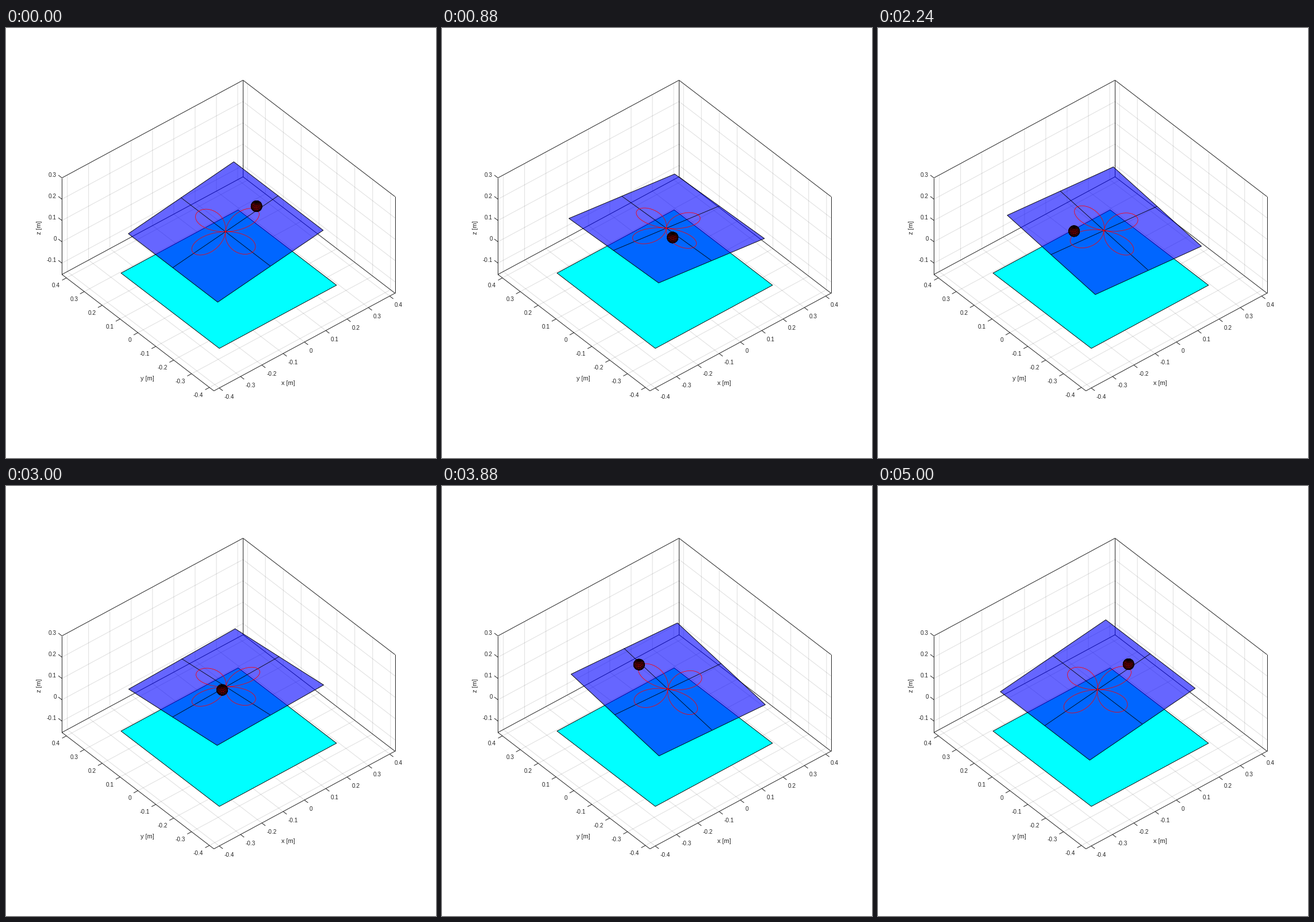
Recreate the animation shown at these times as a matplotlib script. Size 748x748 px, loop 5.04 s.

```python
import numpy as np
import matplotlib.pyplot as plt
from matplotlib.animation import FuncAnimation
from matplotlib.collections import LineCollection, PolyCollection

SIZE, DPI = 748, 64
PX = 72 / DPI                      # one pixel in points
FRAMES, INTERVAL = 126, 40
INK = (0.15, 0.15, 0.15)
THIN = 0.8                         # line weight on the moving parts, in pixels

# orthographic camera
AZ, EL = np.radians(-40), np.radians(40)
SCALE = 483.8
ORIGIN = np.array([387.0, 388.2])
CAMERA = np.array([np.cos(EL) * np.sin(AZ), -np.cos(EL) * np.cos(AZ), np.sin(EL)])
BASIS = SCALE * np.array([
    [np.cos(AZ), np.sin(AZ) * np.sin(EL)],
    [np.sin(AZ), -np.cos(AZ) * np.sin(EL)],
    [0, -np.cos(EL)],
])

# scene, in metres
LIM, Z_LOW, Z_HIGH = 0.425, -0.1533, 0.3
BASE_HALF, BASE_Z = 0.275, -0.13
PLATE_HALF, PLATE_H = 0.25, 0.1
ROSE, RADIUS = 0.15, 0.02
TILT = 0.0141


def project(points):
    return ORIGIN + np.asarray(points, float) @ BASIS


def square(half):
    return np.array([(-half, -half, 0), (half, -half, 0),
                     (half, half, 0), (-half, half, 0)])


def rose_points(theta):
    r = ROSE * np.cos(2 * theta)
    return np.stack([r * np.cos(theta), r * np.sin(theta), 0 * theta], axis=-1)


def plate_pose(theta):
    """Rows are the plate's x, y and normal directions."""
    sb = TILT * (np.cos(theta) + 9 * np.cos(3 * theta))
    sa = TILT * (9 * np.sin(3 * theta) - np.sin(theta))
    cb, ca = np.sqrt(1 - sb**2), np.sqrt(1 - sa**2)
    return np.array([(cb, 0, sb),
                     (-sb * sa, ca, cb * sa),
                     (-sb * ca, -sa, cb * ca)])


def ball_mesh(n=20):
    """Projected faces of the visible half of the sphere, around its centre."""
    lon = np.linspace(-np.pi, np.pi, n + 1)
    lat = np.linspace(-np.pi / 2, np.pi / 2, n + 1)
    u, v = np.meshgrid(lon, lat)
    p = np.stack([np.cos(v) * np.cos(u), np.cos(v) * np.sin(u), np.sin(v)], axis=-1)
    quads = np.stack([p[:-1, :-1], p[:-1, 1:], p[1:, 1:], p[1:, :-1]], axis=2)
    quads = quads.reshape(-1, 4, 3)
    facing = quads.mean(axis=1) @ CAMERA > 0
    return RADIUS * quads[facing] @ BASIS


fig = plt.figure(figsize=(SIZE / DPI, SIZE / DPI), dpi=DPI, facecolor="white")
ax = fig.add_axes([0, 0, 1, 1])
ax.set_xlim(0, SIZE)
ax.set_ylim(SIZE, 0)
ax.axis("off")


def add_lines(segments, z, width=1, **style):
    lines = LineCollection([project(s) for s in segments], linewidths=width * PX,
                           zorder=z, **style)
    return ax.add_collection(lines)


def add_faces(verts, z, width=0.9, **style):
    faces = PolyCollection(verts, linewidths=width * PX, zorder=z,
                           edgecolors="black", **style)
    return ax.add_collection(faces)


def add_text(xy, text, size=10, **style):
    ax.text(*xy, text, fontsize=size * PX, family="Liberation Sans", color=INK,
            va=style.pop("va", "center_baseline"), **style)


def draw_axes():
    ticks = np.arange(-4, 5) / 10
    z_ticks = np.arange(-1, 4) / 10
    grid = []
    for t in ticks:
        grid.append([(t, -LIM, Z_LOW), (t, LIM, Z_LOW), (t, LIM, Z_HIGH)])
        grid.append([(-LIM, t, Z_LOW), (LIM, t, Z_LOW), (LIM, t, Z_HIGH)])
    for t in z_ticks[:-1]:
        grid.append([(-LIM, LIM, t), (LIM, LIM, t), (LIM, -LIM, t)])
    add_lines(grid, 1, colors=[INK + (0.15,)])

    corners = [(-LIM, -LIM), (LIM, -LIM), (LIM, LIM), (-LIM, LIM)]
    floor = [(x, y, Z_LOW) for x, y in corners + corners[:1]]
    roof = [(x, y, Z_HIGH) for x, y in corners[1:]]
    posts = [[(x, y, Z_LOW), (x, y, Z_HIGH)] for x, y in corners[1:]]
    add_lines([floor, roof] + posts, 2, colors=[INK])

    step = 0.02
    marks = []
    for t in ticks:
        on_x, on_y = (t, -LIM, Z_LOW), (-LIM, t, Z_LOW)
        marks.append([on_x, (t, -LIM - step, Z_LOW)])
        marks.append([on_y, (-LIM - step, t, Z_LOW)])
        add_text(project(on_x) + (8.5, 15), f"{t:g}", ha="left")
        add_text(project(on_y) + (-11, 12.5), f"{t:g}", ha="right")
    for t in z_ticks:
        on_z = (-LIM, LIM, t)
        marks.append([on_z, (-LIM, LIM + step, t)])
        add_text(project(on_z) + (-9.5, -6), f"{t:g}", ha="right")
    add_lines(marks, 2, colors=[INK])

    add_text((491, 617), "x [m]", 11, ha="center")
    add_text((245.5, 609), "y [m]", 11, ha="center")
    add_text((58, 347), "z [m]", 11, ha="center", va="center", rotation=90)


draw_axes()
base = project(square(BASE_HALF) + (0, 0, BASE_Z))
add_faces([base], 3, facecolors="cyan")

plate_shape = square(PLATE_HALF)
cross_shape = PLATE_HALF * np.array([[(-1, 0, 0), (1, 0, 0)], [(0, -1, 0), (0, 1, 0)]])
rose_shape = rose_points(np.linspace(0, 2 * np.pi, 201))
ball_shape = ball_mesh()

plate = add_faces([base], 4, facecolors=[(0, 0, 1, 0.6)])
cross = add_lines(cross_shape, 5, THIN, colors="black")
rose, = ax.plot([], [], color="red", lw=THIN * PX, zorder=6)
ball = add_faces(ball_shape, 7, 0.65, facecolors="red")


def update(i):
    theta = 2 * np.pi * i / (FRAMES - 1)
    pose = plate_pose(theta)
    centre = PLATE_H * pose[2]

    def place(points):
        return project(points @ pose + centre)

    plate.set_verts([place(plate_shape)])
    cross.set_segments([place(s) for s in cross_shape])
    rose.set_data(*place(rose_shape).T)
    ball.set_verts(ball_shape + place(rose_points(theta) + (0, 0, RADIUS)))
    return plate, cross, rose, ball


anim = FuncAnimation(fig, update, frames=FRAMES, interval=INTERVAL,
                     repeat=True, repeat_delay=0, blit=False)
plt.show()
```
